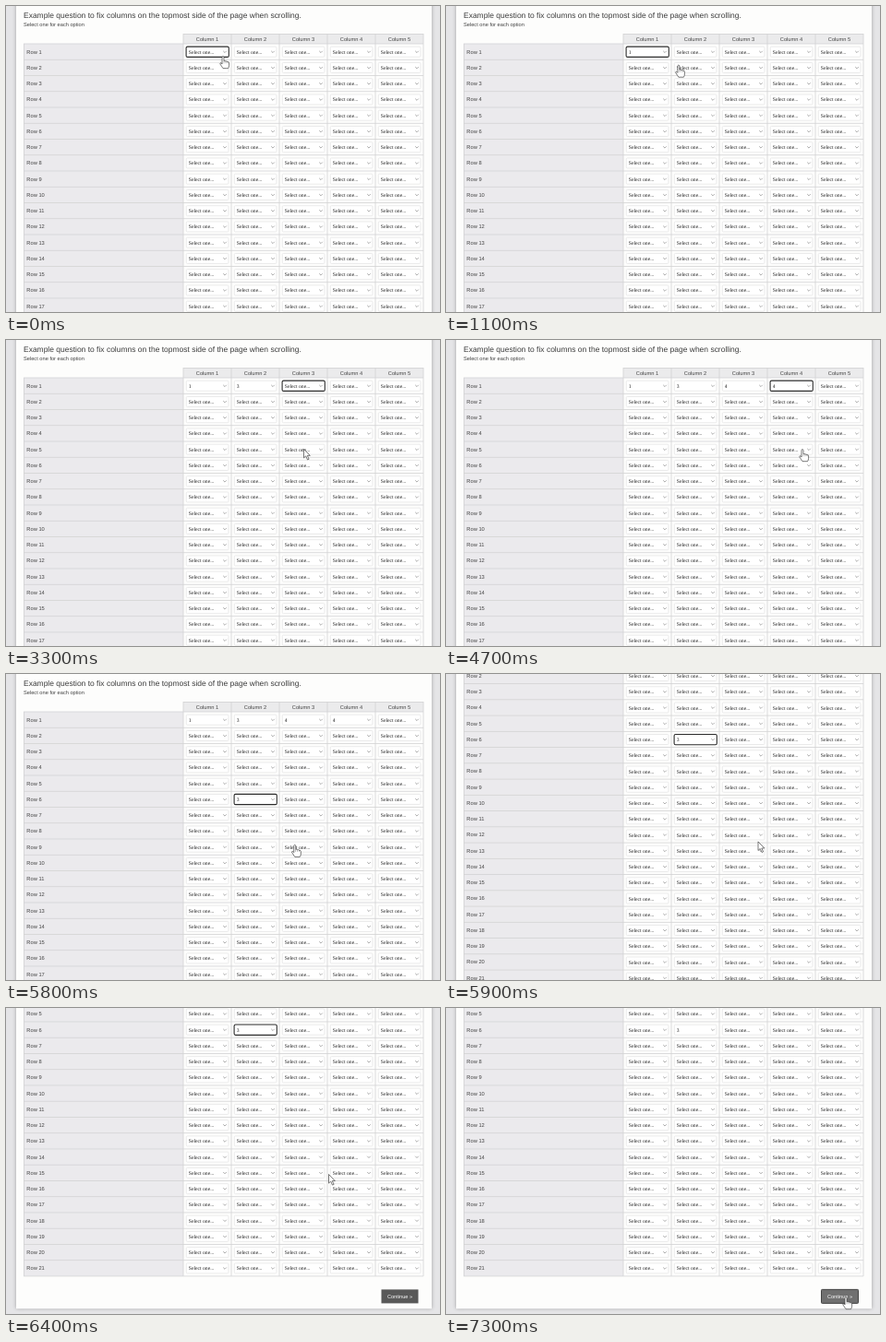
Animation of 470 by 332 pixels, one loop 7.4 s. Source, as an HTML page with a canvas:

```html
<!DOCTYPE html>
<html lang="en">
<head>
<meta charset="utf-8">
<title>Question table</title>
<style>
  html, body { margin: 0; width: 100%; height: 100%; overflow: hidden; background: #e5e5e7; }
  canvas { display: block; }
</style>
</head>
<body>
<canvas id="stage" width="470" height="332"></canvas>
<script>
const ctx = document.getElementById('stage').getContext('2d');
const LOOP = 7400, STEP = 100, TRAVEL = 400, REST = 100;
const ROWS = 21, COLS = 5, ROW_H = 17.25, COL_W = 52;
const LEFT = 19, GRID_X = 192, GRID_Y = 41, RIGHT = GRID_X + COLS * COL_W;
const SCROLL_START = 5800, SCROLL_MS = 400, SCROLL_END = 112.3;
const HOVER = 7000, CLICK = 7200;
const SANS = '"Liberation Sans", Arial, sans-serif';
const SERIF = '"Liberation Serif", "Times New Roman", serif';

// Each visit opens a select and picks an option from its list; x is where the pointer picks.
const visits = [
  { col: 0, row: 0, value: 1, open: 0, pick: 700, x: 241 },
  { col: 1, row: 0, value: 3, open: 1300, pick: 1900, x: 268.7 },
  { col: 2, row: 0, value: 4, open: 2700, pick: 3300, x: 322.5 },
  { col: 3, row: 0, value: 4, open: 3900, pick: 4500, x: 386 },
  { col: 1, row: 5, value: 3, open: 5100, pick: 5500, x: 276 }
];

const rowTop = row => GRID_Y + row * ROW_H;
const optionY = v => rowTop(v.row) + 17.3 + 15 * v.value;

const stops = [
  ...visits.flatMap(v => [
    { t: v.open, x: v.x - 6, y: rowTop(v.row) + 13.3 },
    { t: v.pick, x: v.x, y: optionY(v) }
  ]),
  { t: 6000, x: 349.5, y: 180.5 },
  { t: 6800, x: 425, y: 283 },
  { t: HOVER, x: 433, y: 313.3 }
];

const hand = new Path2D('M-1 1Q0-.7 1 1V5.5Q2 4.7 3 5.8Q4 5.2 5 6.4Q6.6 6 6.6 7.5V10Q6.5 12 5.5 13.4H0' +
  'Q-1.5 11-3 8.8Q-3.5 7.4-2.4 7.4Q-1.6 7.6-1 8.6Z');
const arrow = new Path2D('M0 0V9.6L2.2 7.6 4 11.6 5.6 10.9 3.8 7.1H6.8Z');

const clamp = u => Math.min(1, Math.max(0, u));
const smooth = u => u * u * (3 - 2 * u);

function pointerAt(t) {
  const next = stops.findIndex(s => s.t > t);
  if (next < 0) return stops[stops.length - 1];
  const a = stops[next - 1], b = stops[next];
  const leave = Math.max(a.t + REST, b.t - TRAVEL);
  const k = smooth(clamp((t - leave) / (b.t - leave)));
  return { x: a.x + (b.x - a.x) * k, y: a.y + (b.y - a.y) * k };
}

function scrollAt(t) {
  const left = 1 - clamp((t - SCROLL_START) / SCROLL_MS);
  return SCROLL_END * (1 - left ** 3);
}

function text(str, x, y, size, color = '#444', family = SANS, align = 'left') {
  ctx.save();
  ctx.translate(x, y);
  ctx.rotate(1e-4); // keeps baselines at fractional heights
  ctx.font = `${size}px ${family}`;
  ctx.textRendering = 'geometricPrecision';
  ctx.textAlign = align;
  ctx.fillStyle = color;
  ctx.fillText(str, 0, 0);
  ctx.restore();
}

function rect(x, y, w, h, color) {
  ctx.fillStyle = color;
  ctx.fillRect(x, y, w, h);
}

function outline(x, y, w, h, radius, color, width) {
  ctx.beginPath();
  ctx.roundRect(x, y, w, h, radius);
  ctx.strokeStyle = color;
  ctx.lineWidth = width;
  ctx.stroke();
}

function drawSelect(x, y, value, focused) {
  rect(x + 3, y + 3, 46, 11.5, '#fff');
  if (focused) outline(x + 3.1, y + 3.1, 46.2, 11.3, 1.5, '#2c2c2c', 1.1);
  else outline(x + 3.3, y + 3.2, 45.6, 11, 1, '#e3e3e3', 0.7);
  text(value, x + 5.8, y + 10.7, 5.65, '#222', SERIF);
  ctx.beginPath();
  ctx.moveTo(x + 43.2, y + 7.8);
  ctx.lineTo(x + 45, y + 9.6);
  ctx.lineTo(x + 46.8, y + 7.8);
  ctx.strokeStyle = '#888';
  ctx.lineWidth = 0.7;
  ctx.stroke();
}

function drawPage() {
  ctx.save();
  ctx.shadowColor = 'rgba(0,0,0,.3)';
  ctx.shadowBlur = 4;
  rect(11, -20, 450, 458.5, '#fdfdfc');
  ctx.restore();
  text('Example question to fix columns on the topmost side of the page when scrolling.', LEFT, 13, 8.47, '#3c3c3c');
  text('Select one for each option', LEFT, 22.2, 5.68);
}

function drawTable(t) {
  const bottom = rowTop(ROWS), line = '#d3d3d4';
  const active = t < CLICK && visits.filter(v => v.open <= t).pop();
  rect(GRID_X, 30, RIGHT - GRID_X, 11, '#ebebec');
  rect(LEFT, GRID_Y, GRID_X - LEFT, bottom - GRID_Y, '#ebeaed');
  rect(GRID_X, 30, RIGHT - GRID_X, 0.8, line);
  rect(LEFT, GRID_Y, 0.8, bottom - GRID_Y, line);
  for (let c = 0; c <= COLS; c++) {
    const x = GRID_X + c * COL_W;
    rect(x - 0.4, 30, 0.8, bottom - 30, line);
    if (c < COLS) text('Column ' + (c + 1), x + COL_W / 2, 37.6, 5.7, '#444', SANS, 'center');
  }
  for (let r = 0; r <= ROWS; r++) {
    const y = rowTop(r);
    rect(LEFT, y - 0.4, RIGHT - LEFT, 0.8, line);
    if (r === ROWS) break;
    text('Row ' + (r + 1), 22.3, y + 10.6, 5.75);
    for (let c = 0; c < COLS; c++) {
      const visit = visits.find(v => v.col === c && v.row === r);
      const value = visit && t > visit.pick ? visit.value : 'Select one...';
      drawSelect(GRID_X + c * COL_W, y, value, visit && visit === active);
    }
  }
}

function drawButton(t) {
  rect(406.5, 417.7, 40, 15, t >= HOVER ? '#707070' : '#595959');
  if (t >= CLICK) outline(406.5, 417.7, 40, 15, 1, '#444', 1);
  text('Continue »', 426.5, 427.1, 5.6, '#fff', SANS, 'center');
}

function drawPointer(t) {
  const { x, y } = pointerAt(t);
  const overList = visits.some(v => t > v.pick - TRAVEL && t <= v.pick);
  const overPage = t > SCROLL_START && t < HOVER;
  const shape = overList || overPage ? arrow : hand;
  ctx.save();
  ctx.translate(x, y);
  ctx.fillStyle = '#fff';
  ctx.fill(shape);
  ctx.strokeStyle = '#333';
  ctx.lineWidth = 0.65;
  ctx.lineJoin = 'round';
  ctx.stroke(shape);
  if (shape === hand) {
    for (const knuckle of [1, 3, 5]) rect(knuckle - 0.2, 5.8, 0.4, 2.2, '#666');
  }
  ctx.restore();
}

function draw(t) {
  rect(0, 0, 470, 332, '#e5e5e7');
  ctx.save();
  ctx.translate(0, -scrollAt(t));
  drawPage();
  drawTable(t);
  drawButton(t);
  ctx.restore();
  drawPointer(t);
}

const start = performance.now();
let shown = -1;
function tick() {
  const elapsed = (performance.now() - start) % LOOP;
  const t = Math.floor(elapsed / STEP) * STEP;
  if (t !== shown) draw(shown = t);
  requestAnimationFrame(tick);
}
tick();
</script>
</body>
</html>
```
